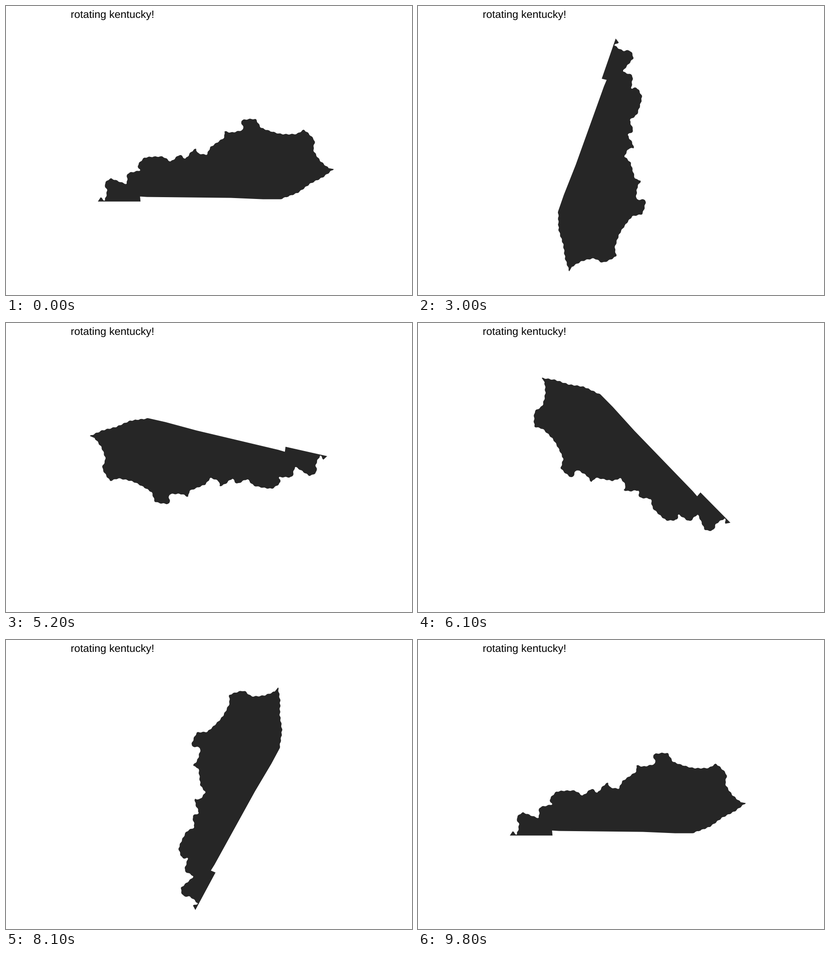
A matplotlib script that plays this animation: 885 by 632 pixels, repeating every 10 s.

```python
import numpy as np
import matplotlib.pyplot as plt
from matplotlib.animation import FuncAnimation
from matplotlib.patches import Polygon
from matplotlib.transforms import Affine2D

W, H, DPI = 885, 632, 64
FRAMES, INTERVAL = 100, 100
STEPS = 99               # equal steps in a full turn
SKIP = 50                # one step is left out halfway round
CENTER = (442.5, 331.5)
INK = "#262626"

plt.rcParams["text.hinting"] = "none"

# Main bends of the outline, clockwise from the western tip
RIVER = [
    (206, 418), (215, 424), (220, 404), (215, 389), (228, 377), (262, 388),
    (265, 366), (291, 359), (287, 348), (303, 331), (341, 329), (359, 339),
    (378, 325), (391, 333), (404, 318), (414, 312), (418, 321), (437, 324),
    (446, 308), (475, 287), (476, 274), (492, 276), (517, 269), (513, 250),
    (543, 247), (557, 266), (598, 279), (633, 279), (650, 271), (672, 293),
    (670, 314), (684, 337), (703, 354),
]
RIDGE = [(714, 356), (690, 374), (663, 388), (635, 408), (597, 422)]
SOUTH = [(560, 422), (490, 419), (307, 417), (292, 416), (293, 427),
         (200, 427)]


def shore(points, n=14, tension=0.32, ripple=0.9, wave=13):
    """Soft curve through the points with a small ripple along it."""
    p = np.array(points, float)
    m = tension * (np.vstack([p[1:], p[-1:]]) - np.vstack([p[:1], p[:-1]]))
    t = np.linspace(0, 1, n, endpoint=False)[None, :, None]
    a, b, ma, mb = (v[:, None] for v in (p[:-1], p[1:], m[:-1], m[1:]))
    ease = t * t * (3 - 2 * t)
    curve = (a + (b - a) * ease + ma * t * (1 - t)**2
             - mb * t * t * (1 - t)).reshape(-1, 2)

    d = np.gradient(curve, axis=0)
    speed = np.hypot(*d.T)
    normal = np.column_stack([d[:, 1], -d[:, 0]]) / speed[:, None]
    swell = ripple * np.sin(2 * np.pi * np.cumsum(speed) / wave)
    swell[0] = 0
    return np.vstack([curve + normal * swell[:, None], p[-1]])


outline = np.vstack([shore(RIVER), shore(RIDGE), SOUTH]) + (0.2, 0.6)

fig = plt.figure(figsize=(W / DPI, H / DPI), dpi=DPI, facecolor="white")
ax = fig.add_axes([0, 0, 1, 1])
ax.set_xlim(0, W)
ax.set_ylim(H, 0)
ax.axis("off")

ax.text(141.3, 26.5, "rotating kentucky!", family="Liberation Sans",
        size=23.3 * 72 / DPI, color="black", va="baseline")
state = ax.add_patch(Polygon(outline, closed=True, fc=INK, ec="none"))


def update(i):
    step = min(i + (i >= SKIP), STEPS)
    turn = Affine2D().rotate_deg_around(*CENTER, 360 * step / STEPS)
    state.set_transform(turn + ax.transData)
    return [state]


anim = FuncAnimation(fig, update, frames=FRAMES, interval=INTERVAL,
                     repeat=True, repeat_delay=0)
plt.show()
```
